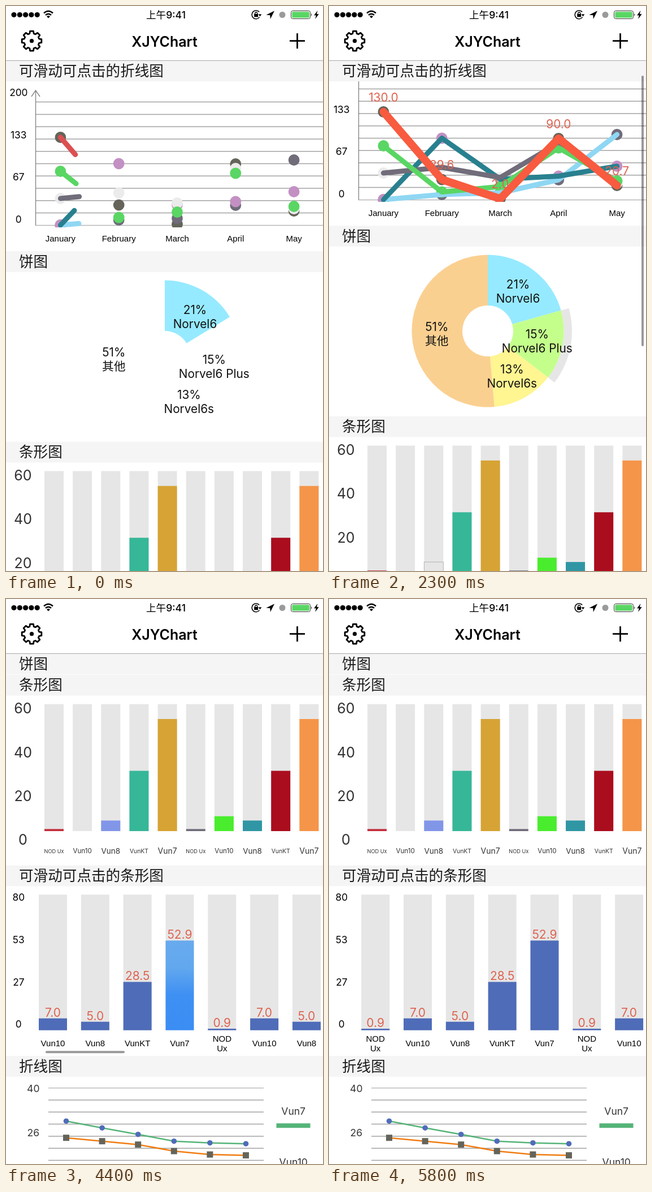
Recreate the animation shown at these times as an HTML page. Size 561x998 px, loop 6000 ms.

```html
<!DOCTYPE html>
<html lang="zh">
<head>
<meta charset="utf-8">
<title>XJYChart</title>
<style>
  html, body { margin: 0; width: 100%; height: 100%; overflow: hidden; background: #fff; }
  svg { display: block; width: 100%; height: 100%; }
  text { font-family: Inter, "Noto Sans CJK SC", "Noto Sans CJK", sans-serif; text-anchor: middle; white-space: pre; }
  text.arial { font-family: "Liberation Sans", Arial, sans-serif; }
</style>
</head>
<body>
<svg id="stage" viewBox="0 0 561 998"></svg>
<script>
const LOOP = 6000, STEP = 100;
const stage = document.getElementById('stage');
const BLUE = '#4f6cb9', TRACK = '#e6e6e6', RED = '#de6350';

function add(parent, tag, attrs = {}, content) {
  const el = document.createElementNS('http://www.w3.org/2000/svg', tag);
  set(el, attrs);
  if (content !== undefined) el.textContent = content;
  parent.appendChild(el);
  return el;
}
function set(el, attrs) {
  for (const key in attrs) el.setAttribute(key, attrs[key]);
}
const group = (parent, attrs) => add(parent, 'g', attrs);
const rect = (parent, x, y, width, height, fill, more) =>
  add(parent, 'rect', { x, y, width, height, fill, ...more });
const circle = (parent, cx, cy, r, fill, more) =>
  add(parent, 'circle', { cx, cy, r, fill, ...more });
const path = (parent, d, stroke, width, more) =>
  add(parent, 'path', { d, stroke, 'stroke-width': width, fill: 'none', ...more });
// y is the middle of the capitals
const label = (parent, str, x, y, size, more) =>
  add(parent, 'text', { x, y: y + size * 0.362, 'font-size': size, ...more }, str);
const polyline = points => 'M' + points.map(p => p.join(' ')).join('L');

function clip(id, x, y, width, height) {
  rect(add(defs, 'clipPath', { id }), x, y, width, height, '#000');
  return { 'clip-path': `url(#${id})` };
}

const clamp = v => Math.max(0, Math.min(1, v));
const progress = (t, start, span) => clamp((t - start) / span);

// cubic-bezier(.42, 0, .58, 1)
function ease(p) {
  let lo = 0, hi = 1, s = p;
  for (let i = 0; i < 24; i++) {
    s = (lo + hi) / 2;
    const x = 1.26 * s * (1 - s) ** 2 + 1.74 * s * s * (1 - s) + s ** 3;
    if (x < p) lo = s; else hi = s;
  }
  return p <= 0 ? 0 : p >= 1 ? 1 : s * s * (3 - 2 * s);
}

// value at t in a table of [time, value]
function track(table, t) {
  const i = table.findIndex(k => k[0] > t);
  if (i < 0) return table[table.length - 1][1];
  if (i === 0) return table[0][1];
  const [t0, v0] = table[i - 1], [t1, v1] = table[i];
  return v0 + (v1 - v0) * (t - t0) / (t1 - t0);
}

const defs = add(stage, 'defs');
const list = group(stage);
const headLayer = group(stage);
const navBar = group(stage);

// ---- scrollable line chart
const GRID = '#a3a3a3', BASE = 387.4, DAYS = ['January', 'February', 'March', 'April', 'May'];
const dayX = i => 96.4 + 103.3 * i;
const SERIES = [
  { line: '#8fd7f3', dot: '#706c7a', ys: [387, 378, 375, 352, 272] },
  { line: '#28808f', dot: '#c390c3', ys: [387, 278.5, 351, 345.5, 328] },
  { line: '#706c7a', dot: '#ebebeb', ys: [340, 330, 348, 287, 358] },
  { line: '#59d663', dot: '#59d663', ys: [292, 373.5, 364, 295.5, 354] },
  { line: '#dc5052', dot: '#64645a', ys: [232, 351.5, 385.5, 279, 362] }
];
const RED_VALUES = [130, 29.6, 2, 90, 20.7];

const lineCell = group(list);
for (let i = 0; i <= 10; i++)
  path(lineCell, `M52 ${BASE - 21.78 * i}H561`, i ? GRID : '#b8b8b8', 1.5);
path(lineCell, `M52.5 ${BASE}V149M45 160L52.5 149L60 160`, '#858585', 1.4);
[200, 133, 67, 0].forEach((v, i) => label(lineCell, v, 22.3, 152.5 + 74.8 * i, 17.3));
DAYS.forEach((d, i) => label(lineCell, d, dayX(i), 410.5, 15, { class: 'arial' }));

const plot = group(lineCell, clip('plot', 52, 133, 509, 258));
[SERIES[4], ...SERIES.slice(0, 4)].forEach(s =>
  s.ys.forEach((y, i) => circle(plot, dayX(i), y, 9.9, s.dot)));
const lines = SERIES.map(s => path(plot, polyline(s.ys.map((y, i) => [dayX(i), y])), s.line, 9,
  { pathLength: 1, 'stroke-linecap': 'round', 'stroke-linejoin': 'round' }));
const redLabels = RED_VALUES.map((v, i) =>
  label(lineCell, '', dayX(i), SERIES[4].ys[i] - 25.8, 20.8, { fill: RED }));

// ---- pie
const PX = 281, PY = 619, R_IN = 45, R_OUT = 134.5;
const SLICES = [
  { from: 0, to: 0.2067, fill: '#96eaff' },
  { from: 0.2067, to: 0.3545, fill: '#c4ff8c' },
  { from: 0.3545, to: 0.486, fill: '#fff591' },
  { from: 0.486, to: 1, fill: '#fad091' }
];
function sector(from, to, r0, r1) {
  if (to <= from) return '';
  const big = to - from > 0.5 ? 1 : 0;
  const at = (f, r) => {
    const a = f * 2 * Math.PI;
    return `${PX + r * Math.sin(a)} ${PY - r * Math.cos(a)}`;
  };
  return `M${at(from, r0)}L${at(from, r1)}A${r1} ${r1} 0 ${big} 1 ${at(to, r1)}` +
    `L${at(to, r0)}A${r0} ${r0} 0 ${big} 0 ${at(from, r0)}Z`;
}
const pieCell = group(list);
const halo = add(pieCell, 'path', { d: sector(0.2067, 0.3545, R_OUT, 149), fill: TRACK });
const slices = SLICES.map(s => add(pieCell, 'path', { fill: s.fill }));
[['21%', 'Norvel6', 334.5, 536], ['15%', 'Norvel6 Plus', 368.3, 624],
 ['13%', 'Norvel6s', 323.8, 686], ['51%', '其他', 190.8, 611]].forEach(([pct, name, x, y]) => {
  label(pieCell, pct, x, y, 20.8, { fill: '#111' });
  label(pieCell, name, x, y + 25.4, 20.8, { fill: '#111' });
});

// ---- plain bars
const NAMES = ['NOD Ux', 'Vun10', 'Vun8', 'VunKT', 'Vun7'];
const SIZES = [9.2, 11.6, 13.5, 10.4, 14];
const BARS = [
  ['#c32d3c', 3.7], ['none', 0], ['#8296e8', 18.7], ['#36b798', 106.5], ['#d6a334', 198],
  ['#706c7a', 3.7], ['#4aed2e', 26.3], ['#3096a4', 18.7], ['#aa0d1e', 106.5], ['#f59549', 198]
];
const barCell = group(list);
[60, 40, 20, 0].forEach((v, i) => label(barCell, v, 30, 829 + 77.4 * i, 25, { fill: '#333' }));
const bars = BARS.map(([fill, h], i) => {
  const x = 68 + 50.15 * i;
  rect(barCell, x, 821.5, 34, 224.3, TRACK);
  label(barCell, NAMES[i % 5], x + 17, 1081, SIZES[i % 5], { fill: '#333' });
  return rect(barCell, x, 1045.8 - h, 34, h, fill);
});

// ---- scrollable bars
const FLOOR = 1397.5, FULL = 239.5, VALUES = [0.9, 7, 5, 28.5, 52.9], PITCH = 74.82;
const glow = add(defs, 'linearGradient', { id: 'glow', x1: 0, y1: 0, x2: 0, y2: 1 });
[[0, '#68aaee'], [0.3, '#62a8ee'], [0.6, '#3f90f3'], [1, '#3b8df4']].forEach(([offset, color]) =>
  add(glow, 'stop', { offset, 'stop-color': color }));

const slideCell = group(list);
[80, 53, 27, 0].forEach((v, i) => label(slideCell, v, 22.3, 1162.5 + 74.8 * i, 17.3));
const slider = group(group(slideCell, clip('slide', 52, 1142, 509, 300)));
const columns = Array.from({ length: 13 }, (_, i) => {
  const x = 57.2 + PITCH * i, mid = x + 25, k = i % 5;
  rect(slider, x, 1158, 50, FULL, TRACK);
  const words = k ? [NAMES[k]] : NAMES[k].split(' ');
  words.forEach((w, n) =>
    label(slider, w, mid, k ? 1420.5 : 1412 + 17 * n, 15, { class: 'arial' }));
  return {
    value: VALUES[k],
    bar: rect(slider, x, FLOOR, 50, 0, BLUE),
    text: label(slider, '', mid, 0, 21, { fill: RED })
  };
});
const hBar = rect(slideCell, 50, 1434, 140, 4, '#000', { rx: 2 });

// ---- plain line chart
const trendCell = group(list);
for (let i = 0; i < 11; i++)
  path(trendCell, `M75 ${1499.5 + 21.3 * i}H456`, i ? GRID : '#bdbdbd', 1.5);
[40, 26].forEach((v, i) => label(trendCell, v, 48.3, 1500 + 78.5 * i, 17.5, { fill: '#333' }));
const trendX = i => 106.5 + 63.6 * i;
const TRENDS = [
  { color: '#55b478', ys: [922, 934, 945.5, 957.5, 960.5, 962] },
  { color: '#f07d12', ys: [951.5, 957.5, 963.5, 975, 981, 982.5] }
];
const trendLines = TRENDS.map(s => path(trendCell,
  polyline(s.ys.map((y, i) => [trendX(i), y + 636])), s.color, 2.6, { pathLength: 1 }));
TRENDS[0].ys.forEach((y, i) => circle(trendCell, trendX(i), y + 636, 4.8, BLUE));
TRENDS[1].ys.forEach((y, i) => rect(trendCell, trendX(i) - 5.5, y + 630.5, 11, 11, '#64645a'));
label(trendCell, 'Vun7', 508.7, 1540, 17.5, { fill: '#333' });
rect(trendCell, 478.5, 1562, 60, 8, '#55b478');
label(trendCell, 'Vun10', 508.7, 1630, 17.5, { fill: '#333' });

// ---- section headers, the current one sticks below the nav bar
const HEAD = 36.7;
const heads = ['可滑动可点击的折线图', '饼图', '条形图', '可滑动可点击的条形图', '折线图'].map((title, i) => {
  const g = group(headLayer);
  rect(g, 0, 0, 561, HEAD, '#f5f5f5');
  add(g, 'text', { x: 23, y: 27.6, 'font-size': 25.6, 'font-weight': 500, fill: '#1a1a1a',
    style: 'text-anchor:start' }, title);
  return { g, y: 96.5 + 336.6 * i };
});

// ---- status and nav bars
rect(navBar, 0, 0, 561, 96.5, '#fff');
rect(navBar, 0, 95.8, 561, 1.2, '#b2b2b2');
for (let i = 0; i < 5; i++) circle(navBar, 14 + 10.3 * i, 15.5, 4.6, '#000');
path(navBar, 'M67 12.5Q75 5.5 83 12.5M70 16Q75 11.8 80 16', '#000', 2.4);
path(navBar, 'M75 21.5L72 18.4Q75 16 78 18.4Z', 'none', 0, { fill: '#000' });
label(navBar, '上午9:41', 283, 15.5, 17.6, { 'font-weight': 500 });
path(navBar, 'M448.2 10.6A7.4 7.4 0 1 0 448.6 19.6', '#000', 1.6);
path(navBar, 'M446.6 14.5H452.4L449.5 18.6Z', 'none', 0, { fill: '#000' });
rect(navBar, 439.2, 14, 7, 5.4, '#000');
path(navBar, 'M440.7 14.5V13A2 2 0 0 1 444.7 13V14.5', '#000', 1.3);
path(navBar, 'M475 8.5L460.5 15.8L467.3 16.2L467.8 23Z', 'none', 0, { fill: '#000' });
circle(navBar, 489, 15.5, 5.5, '#9a9a9a');
rect(navBar, 504.5, 8.5, 34, 14, '#fff', { rx: 3, stroke: '#333', 'stroke-width': 1 });
rect(navBar, 506.2, 10.2, 30.6, 10.6, '#59d663', { rx: 1.6 });
path(navBar, 'M540 13Q542.6 15.5 540 18Z', 'none', 0, { fill: '#333' });
path(navBar, 'M551.5 8L545 16.6H548.8L547 23L553.7 14.2H549.8Z', 'none', 0, { fill: '#000' });

const teeth = [];
for (let k = 0; k < 8; k++)
  [[-0.27, 13.6], [-0.17, 17.6], [0.17, 17.6], [0.27, 13.6]].forEach(([da, r]) => {
    const a = k * Math.PI / 4 + da;
    teeth.push([45.5 + r * Math.sin(a), 61.7 - r * Math.cos(a)]);
  });
path(navBar, polyline(teeth) + 'Z', '#000', 2.8, { 'stroke-linejoin': 'round' });
circle(navBar, 45.5, 61.7, 3.6, '#000');
label(navBar, 'XJYChart', 280.5, 63, 25, { 'font-weight': 600 });
path(navBar, 'M502 61.7H529M515.5 48.2V75.2', '#000', 2.8);
const vBar = rect(stage, 553, 99, 4, 478, '#000', { rx: 2 });

// ---- motion
const SCROLL = [[2200, 0], [2300, 45], [2400, 150], [2500, 390], [2600, 538], [2700, 598],
  [2800, 624], [2900, 633], [3000, 635.8]];
const SLIDE = [[4200, 0], [4300, 24], [4400, 74], [4500, 126], [4600, 166], [4700, 188],
  [4900, 196], [5100, 172], [5200, 139], [5300, 82], [5400, 30], [5500, 7], [5600, 0]];
const V_FADE = [[2100, 0], [2200, 0.4], [3000, 0.4], [3300, 0]];
const H_FADE = [[4200, 0], [4300, 0.4], [5400, 0.4], [5600, 0]];

function draw(t) {
  const drawn = ease(progress(t, -152, 800));
  lines.forEach(l => set(l, { 'stroke-dasharray': `${drawn} 2` }));
  const picked = t >= 620;
  set(lines[4], { stroke: picked ? '#f85b3f' : '#dc5052', 'stroke-width': picked ? 14 : 9 });
  const count = progress(t, 618, 1200);
  redLabels.forEach((l, i) => { l.textContent = picked ? (RED_VALUES[i] * count).toFixed(1) : ''; });

  const sweep = progress(t, -155, 950);
  slices.forEach((el, i) => {
    const s = SLICES[i];
    set(el, { d: sector(s.from, Math.min(s.to, sweep), R_IN, R_OUT) });
  });
  set(halo, { opacity: t >= 1800 ? 1 : 0 });

  const filled = t >= 2700;
  set(bars[2], { fill: filled ? BARS[2][0] : TRACK, stroke: filled ? 'none' : '#a5a5a5', 'stroke-width': 0.8 });

  const p = progress(t, 2416, 1200), grow = ease(p);
  const slide = track(SLIDE, t);
  columns.forEach((c, i) => {
    const h = c.value / 80 * FULL * grow;
    set(c.bar, { y: FLOOR - h, height: h,
      fill: i === 4 && t >= 4000 && t < 4700 ? 'url(#glow)' : BLUE });
    set(c.text, { y: FLOOR - h - 10.8 + 7.6 });
    c.text.textContent = (c.value * p).toFixed(1);
  });
  set(slider, { transform: `translate(${-slide} 0)` });
  set(hBar, { x: 50.5 + slide * 0.263, opacity: track(H_FADE, t) });

  const reveal = ease(progress(t, 2500, 800));
  trendLines.forEach(l => set(l, { 'stroke-dasharray': `${reveal} 2` }));

  const scroll = track(SCROLL, t);
  set(list, { transform: `translate(0 ${-scroll})` });
  heads.forEach((h, i) => {
    const next = i < 4 ? heads[i + 1].y - scroll - HEAD : Infinity;
    set(h.g, { transform: `translate(0 ${Math.min(next, Math.max(96.5, h.y - scroll))})` });
  });
  set(vBar, { y: 99 + scroll * 0.535, opacity: track(V_FADE, t) });
}

const begin = performance.now();
function tick() {
  const t = (performance.now() - begin) % LOOP;
  draw(Math.floor(t / STEP) * STEP);
  requestAnimationFrame(tick);
}
tick();
</script>
</body>
</html>
```
